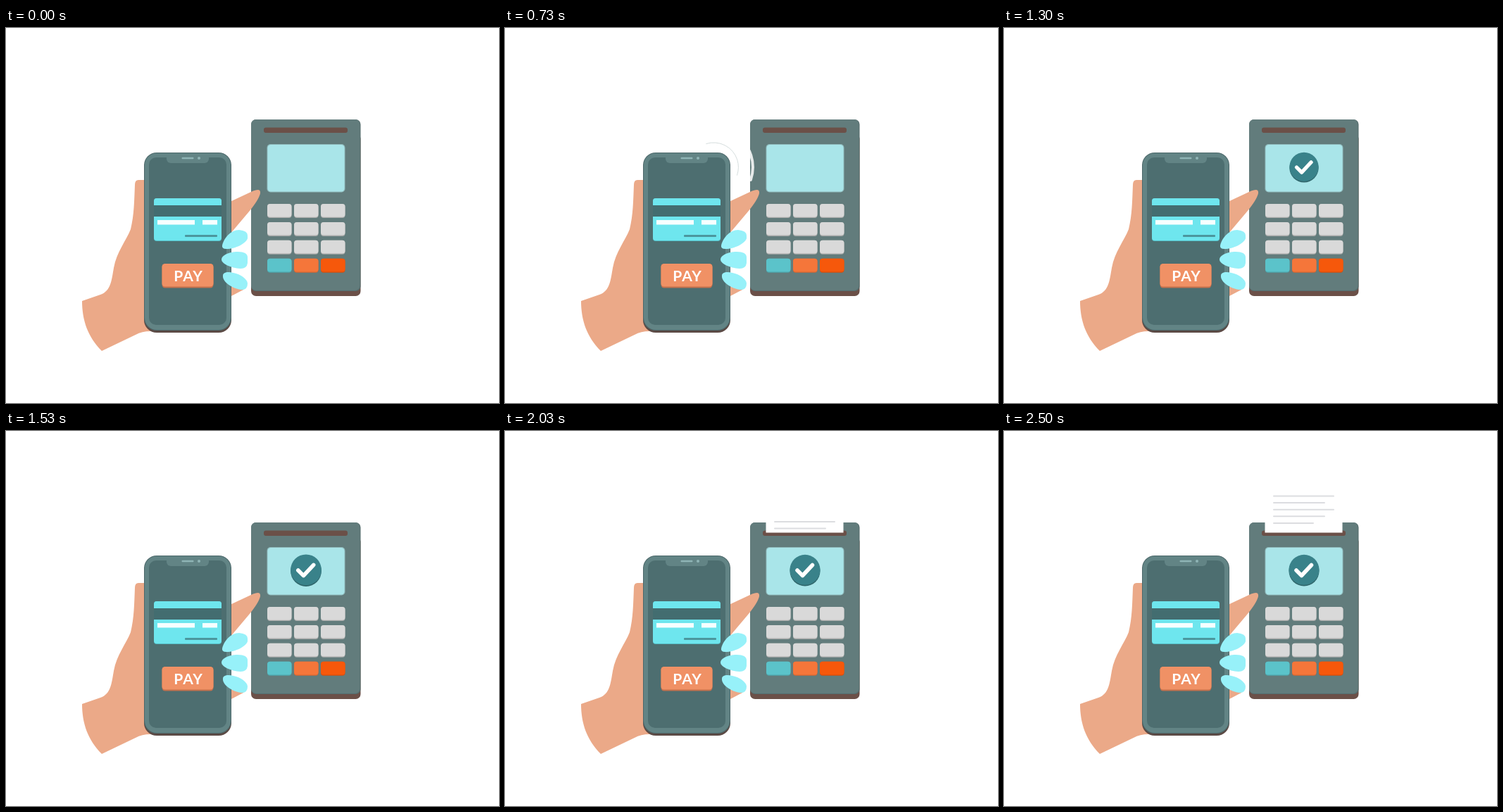
Recreate the animation shown at these times as an HTML page with a canvas. Size 700 by 533 pixels, loop 3.46 s.

```html
<!DOCTYPE html>
<html lang="en">
<head>
<meta charset="utf-8">
<title>Contactless payment</title>
<style>
html, body { margin: 0; width: 100%; height: 100%; overflow: hidden; background: #fff; }
canvas { display: block; width: 700px; height: 533px; }
</style>
</head>
<body>
<canvas id="stage" width="700" height="533"></canvas>
<script>
const ctx = document.getElementById('stage').getContext('2d');
const LOOP = 3460;
const SKIN = '#eba988';
const NAIL = '#97f1f9';
const BROWN = '#6b5048';

const progress = (t, from, to) => Math.min(1, Math.max(0, (t - from) / (to - from)));
const easeInOut = u => (1 - Math.cos(Math.PI * u)) / 2;
const easeOut = u => 1 - (1 - u) ** 3;
const easeOutBack = u => 1 + 2.2 * (u - 1) ** 3 + 1.2 * (u - 1) ** 2;

function box(x, y, w, h, r, color) {
  ctx.fillStyle = color;
  ctx.beginPath();
  ctx.roundRect(x, y, w, h, r);
  ctx.fill();
}

function shape(d, color) {
  ctx.fillStyle = color;
  ctx.fill(new Path2D(d));
}

function disc(x, y, r, color) {
  ctx.fillStyle = color;
  ctx.beginPath();
  ctx.arc(x, y, r, 0, Math.PI * 2);
  ctx.fill();
}

function scaled(x, y, s, draw) {
  ctx.save();
  ctx.translate(x, y);
  ctx.scale(s, s);
  ctx.translate(-x, -y);
  draw();
  ctx.restore();
}

function drawTerminal() {
  box(348, 150, 155.5, 231, 7, BROWN);
  box(348, 130, 155.5, 244, 7, '#546c6d');
  box(348, 130, 154.5, 243, 7, '#627c7c');
  box(366, 141.5, 119, 7.5, 3, BROWN);
  box(370.5, 165, 111, 68.5, 5, '#8fb9bb');
  box(371.5, 166, 109, 66.5, 4.5, '#a9e5e9');
  for (let row = 0; row < 4; row++) {
    for (let col = 0; col < 3; col++) {
      const x = 371 + col * 38;
      const y = 250 + row * 25.9;
      const last = row === 3;
      box(x, y, 34.5, 20, 4, last ? ['#4da5ab', '#d86631', '#d64d0d'][col] : '#a9aaa9');
      box(x, y, 34.5, 18.7, 4, last ? ['#5bc3ca', '#f5763a', '#f6580b'][col] : '#d9d9d9');
    }
  }
}

function drawReceipt(t) {
  if (t < 1630) return;
  const top = 145 - 65 * easeInOut(progress(t, 1630, 2500));
  ctx.save();
  ctx.beginPath();
  ctx.rect(366, 60, 120, 84.5);
  ctx.clip();
  box(370.5, top, 110, 90, 0, '#fff');
  [87, 74, 87, 74, 58].forEach((w, i) =>
    box(382, top + 11.5 + i * 9.6, w, 2, 1, '#dcdde0'));
  ctx.restore();
}

function drawCheck(t) {
  if (t < 1100) return;
  const s = Math.max(0, easeOutBack(progress(t, 1100, 1600)));
  scaled(426, 198, s, () => {
    disc(426, 199, 21.5, '#30666b');
    disc(426, 197.3, 21.5, '#39828a');
    ctx.strokeStyle = '#fff';
    ctx.lineWidth = 5.5;
    ctx.lineCap = ctx.lineJoin = 'round';
    ctx.stroke(new Path2D('M415 198L422.5 205.5L436.5 190.5'));
  });
}

function drawHand() {
  shape('M196 216H188Q183 216 183 223C182 247 182 265 177 286C171 302 157 318 153 341' +
    'C150 358 149 374 134 379L108 388C108 415 116 439 136 459L184 436Q193 431 205 431H230V216Z', SKIN);
  shape('M318 247L351 231.5Q362 227 361 235Q359 244 345 261L318 293Z', SKIN);
  shape('M318 365H341L337 372L318 382Z', SKIN);
}

function drawPhone() {
  box(196, 180, 124, 253, 18, '#5b4a45');
  box(196, 177, 124, 253, 18, '#4c686a');
  box(197, 178, 122, 251, 17, '#628485');
  box(203, 184, 110, 238, 10, '#4d6e70');
  box(228, 182, 60, 10, [0, 0, 6, 6], '#628485');
  box(249.5, 183.8, 17, 2.4, 1.2, '#8fb5b6');
  disc(274, 185, 2, '#8fb5b6');

  box(210, 242, 96, 61, 4, '#55bcc4');
  box(210, 242, 96, 60, 4, '#6ee6ee');
  box(210, 252, 96, 16, 0, '#436d70');
  box(215, 273, 53, 6.5, 0, '#f6ffff');
  box(279, 273, 21, 6.5, 0, '#f6ffff');
  box(254, 294, 46, 3, 1, '#4b979e');
}

function drawButton(t) {
  const press = Math.sin(Math.PI * progress(t, 30, 330));
  scaled(258, 352, 1 - 0.1 * press, () => {
    box(221.5, 335, 73, 34.5, 4.5, '#c5704d');
    box(221.5, 335, 73, 32.5, 4.5, '#f09165');
    ctx.fillStyle = '#fff';
    ctx.font = 'bold 21px Lato, sans-serif';
    ctx.letterSpacing = '1px';
    ctx.textAlign = 'center';
    ctx.textBaseline = 'alphabetic';
    ctx.fillText('PAY', 259, 359.5);
  });
}

function drawNails() {
  shape('M307 309C309 299 319 287 331 287Q343 288 343 295V299C341 306 326 314 313 314Q306 314 307 309Z', NAIL);
  shape('M306 329C306 323 317 318 329 318Q343 318 343 326V334Q342 342 333 342C319 341 306 335 306 329Z', NAIL);
  shape('M308 352C308 347 315 346 323 348C333 350 343 357 343 363Q343 372 335 372C322 371 307 361 308 352Z', NAIL);
}

function drawWaves(t) {
  if (t < 570 || t > 1090) return;
  const slide = 1 - easeOut(progress(t, 570, 1070));
  const alpha = progress(t, 570, 700) * (1 - progress(t, 820, 1070));
  const x = 304.5 - 26 * slide;
  const y = 191 + 22 * slide;
  const arc = (r, width, color) => {
    ctx.strokeStyle = color;
    ctx.lineWidth = width;
    ctx.beginPath();
    ctx.arc(x, y, r, -1.88, 0.33);
    ctx.stroke();
  };
  ctx.save();
  ctx.lineCap = 'round';
  ctx.globalAlpha = Math.min(1, alpha * 0.85);
  arc(33, 4, '#fff');
  arc(55.5, 4, '#fff');
  // Faint rim that keeps the inner wave visible on white.
  ctx.globalAlpha = Math.min(1, alpha * 2);
  arc(35, 0.8, '#cbd5d5');
  ctx.restore();
}

function draw(t) {
  ctx.fillStyle = '#fff';
  ctx.fillRect(0, 0, 700, 533);
  drawTerminal();
  drawReceipt(t);
  drawCheck(t);
  drawHand();
  drawPhone();
  drawButton(t);
  drawNails();
  drawWaves(t);
}

const start = performance.now();
function tick() {
  draw((performance.now() - start) % LOOP);
  requestAnimationFrame(tick);
}
tick();
</script>
</body>
</html>
```
